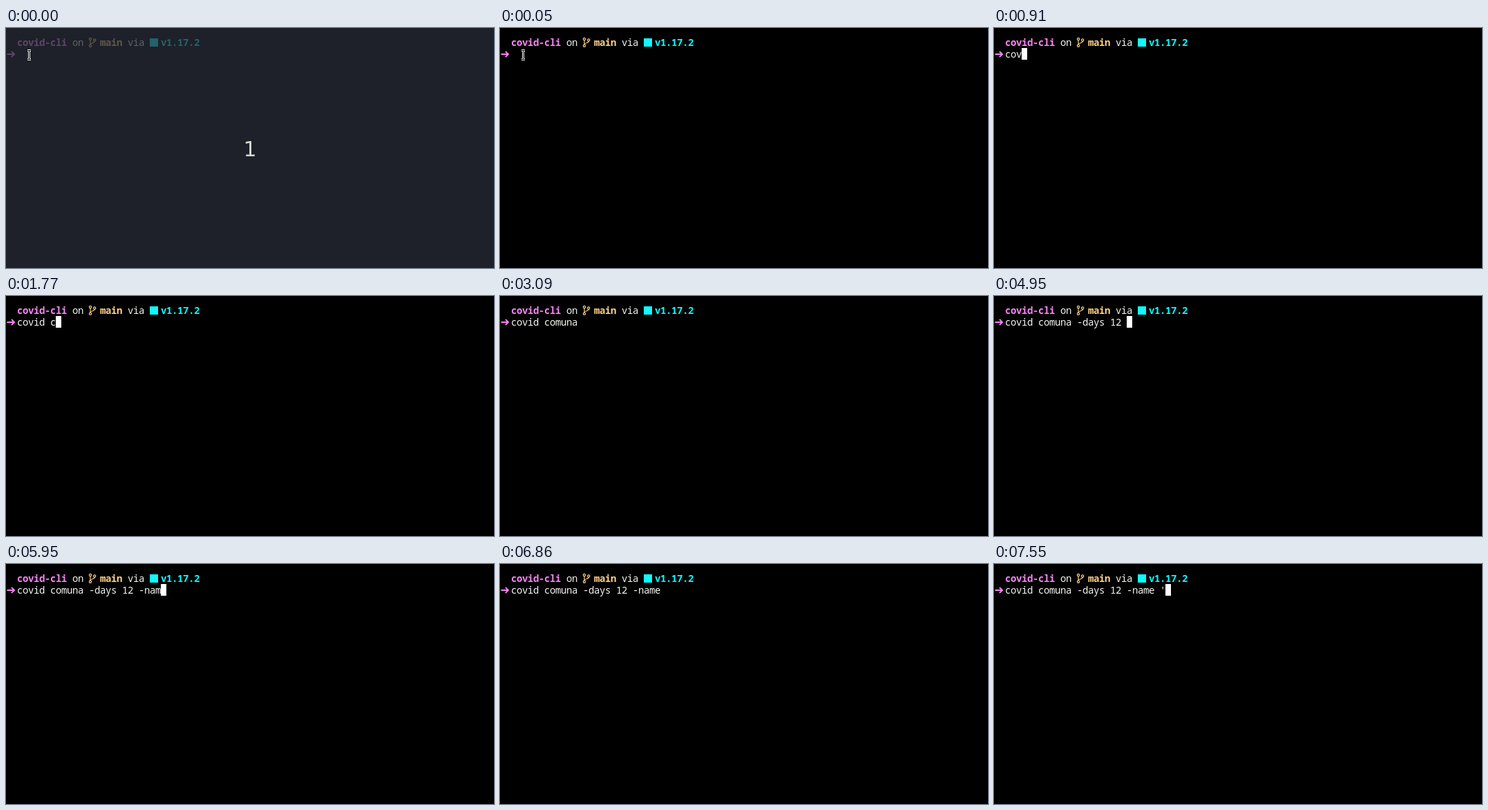
Write an HTML page that moves like this. It is 706x348 px and loops after 8000 ms.

```html
<!DOCTYPE html>
<html lang="en">
<head>
<meta charset="utf-8">
<title>Terminal typing</title>
<style>
  html, body { margin: 0; width: 100%; height: 100%; overflow: hidden; background: #000; }
  svg { display: block; width: 100vw; height: 100vh; }
  text { font: 14px "Noto Sans Mono", "DejaVu Sans Mono", monospace; letter-spacing: -0.4px; white-space: pre; }
  .bold { font-weight: 700; }
  .pink { fill: #fb83f7; }
  .gold { fill: #ffd184; }
  .cyan { fill: #12f8ff; }
  .plain { fill: #f6f6f2; }
  .line { fill: none; }
  #count text { font: 30px "DejaVu Sans", sans-serif; letter-spacing: 0; fill: #d6d7d2; }
</style>
</head>
<body>
<svg viewBox="0 0 706 348">
  <rect width="706" height="348"/>

  <text class="pink bold" x="16" y="26">covid-cli</text>
  <text class="plain" x="96" y="26">on</text>
  <g class="line" stroke="#ffd184" stroke-width="1.2">
    <circle cx="122" cy="16" r="1.6"/>
    <circle cx="122" cy="25.8" r="1.6"/>
    <circle cx="128.2" cy="17.5" r="1.6"/>
    <path d="M122 17.6V24.2M128.2 19.1C128.2 22.5 122.4 21 122 24"/>
  </g>
  <text class="gold bold" x="136" y="26">main</text>
  <text class="plain" x="176" y="26">via</text>
  <rect class="cyan" x="208" y="15" width="12" height="12"/>
  <text class="cyan bold" x="224" y="26">v1.17.2</text>

  <path class="line" stroke="#fb83f7" stroke-width="1.9" d="M1.5 38H12M8 34L12 38L8 42"/>
  <text id="typed" class="plain" x="16" y="43"></text>
  <rect id="caret" y="29" width="8" height="17" fill="#fff"/>

  <g id="count">
    <rect width="706" height="348" fill="#292d38" opacity=".74"/>
    <text x="353" y="186" text-anchor="middle">1</text>
  </g>

  <g id="pointer" class="line">
    <path id="beam" stroke="#fff" stroke-width="3" d="M31 32.5H36M33.5 32.5V45.5M31 45.5H36"/>
    <use href="#beam"/>
    <path stroke="#000" stroke-width="1" d="M31 32.5H36M33.5 32.5V45.5M31 45.5H36"/>
  </g>
</svg>
<script>
const LOOP = 8000, CELL = 8, LEFT = 16;
const COMMAND = "covid comuna -days 12 -name '";
// Key press times, one per character of the command
const KEYS = [
  550, 770, 910, 1050, 1180, 1360,
  1770, 1860, 1910, 2090, 2180, 2360, 2550,
  3180, 3270, 3410, 3640, 3770, 4450,
  4680, 4770, 4950,
  5550, 5730, 5910, 5950, 6180, 6270, 7550
];
const CARET_OFF = [[0, 320], [3090, 3180], [6860, 7450]];

const el = id => document.getElementById(id);
const typed = el("typed"), caret = el("caret"), count = el("count"), pointer = el("pointer");
const show = (node, on) => node.setAttribute("visibility", on ? "visible" : "hidden");

function draw(t) {
  const n = KEYS.filter(k => k <= t).length;
  typed.textContent = COMMAND.slice(0, n);
  caret.setAttribute("x", LEFT + n * CELL);
  show(caret, !CARET_OFF.some(([a, b]) => t >= a && t < b));
  show(count, t < 50);
  show(pointer, t < 590);
}

const start = performance.now();
function tick() {
  draw((performance.now() - start) % LOOP);
  requestAnimationFrame(tick);
}
draw(0);
requestAnimationFrame(tick);
</script>
</body>
</html>
```
